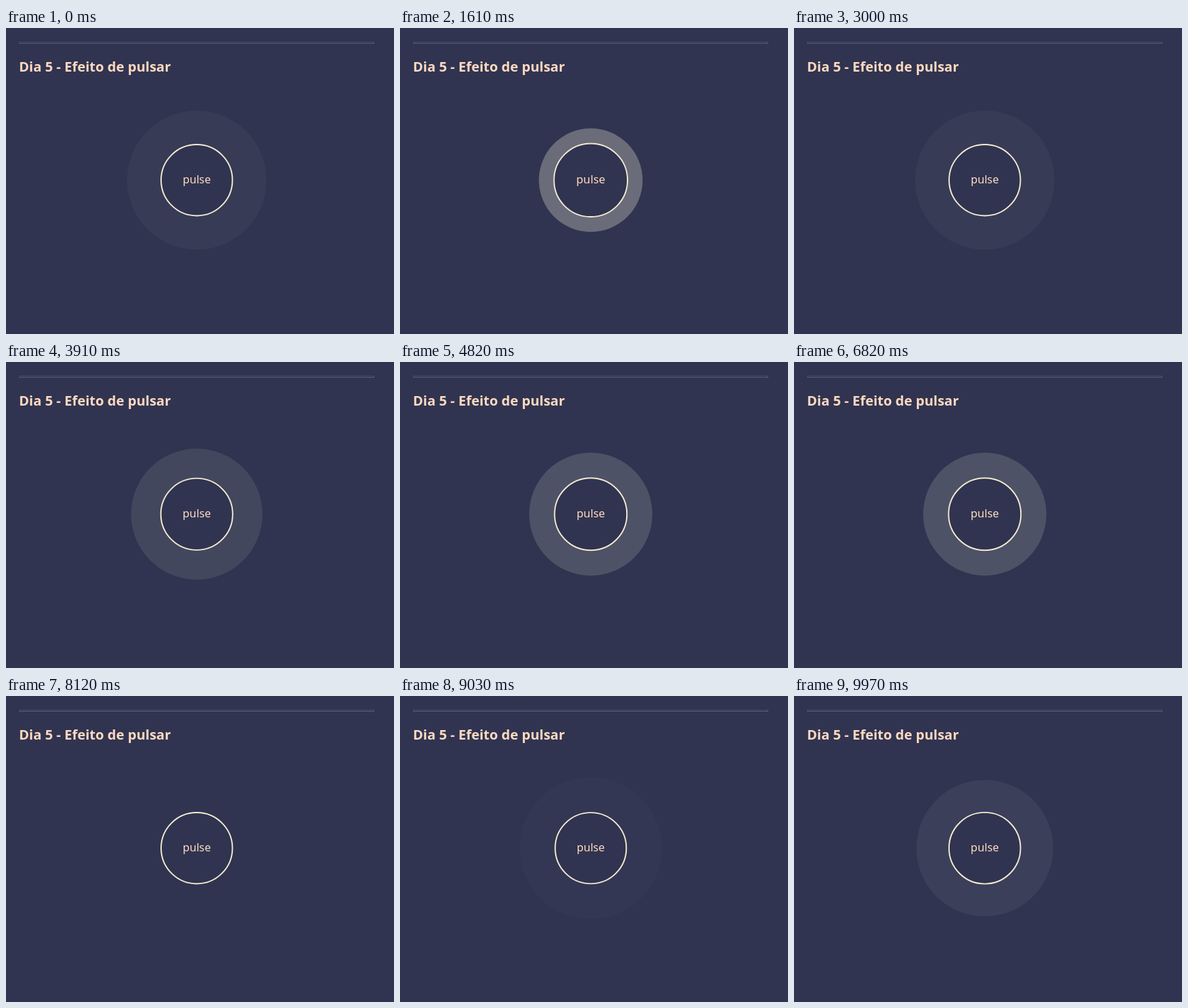
An HTML page that plays this animation: 568x449 px, repeating every 10 s.

```html
<!DOCTYPE html>
<html lang="pt">
<head>
<meta charset="utf-8">
<title>Efeito de pulsar</title>
<style>
  html, body { margin: 0; width: 100%; height: 100%; overflow: hidden; background: #303450; }
  body { position: relative; font-family: "Noto Sans", "Open Sans", sans-serif; color: #ffdac1; }
  .rule {
    position: absolute; left: 19px; top: 20px; width: 518px; height: 1px;
    border: 1px solid; border-color: #454862 #5b5d74 #5b5d74 #454862;
  }
  h1 {
    position: absolute; left: 19px; top: 42px; margin: 0;
    font-size: 20px; line-height: 29px; font-weight: 700; white-space: nowrap;
  }
  .pulse {
    position: absolute; left: 223px; top: 167px; width: 112px; height: 112px;
    box-sizing: border-box; border: 2px solid #f5ebd3; border-radius: 50%;
    font-size: 17.1px; line-height: 106px; text-align: center;
    translate: .25px .25px;
    animation: pulse 1s linear -.67s infinite;
  }
  @keyframes pulse {
    0% { transform: scale(1); box-shadow: 0 0 0 0 rgba(248, 247, 225, .47); }
    73% { transform: scale(.945); box-shadow: 0 0 0 56px rgba(248, 247, 225, 0); animation-timing-function: ease-in; }
    100% { transform: scale(1); box-shadow: 0 0 0 0 rgba(248, 247, 225, 0); }
  }
</style>
</head>
<body>
  <div class="rule"></div>
  <h1>Dia 5 - Efeito de pulsar</h1>
  <div class="pulse">pulse</div>
</body>
</html>
```
